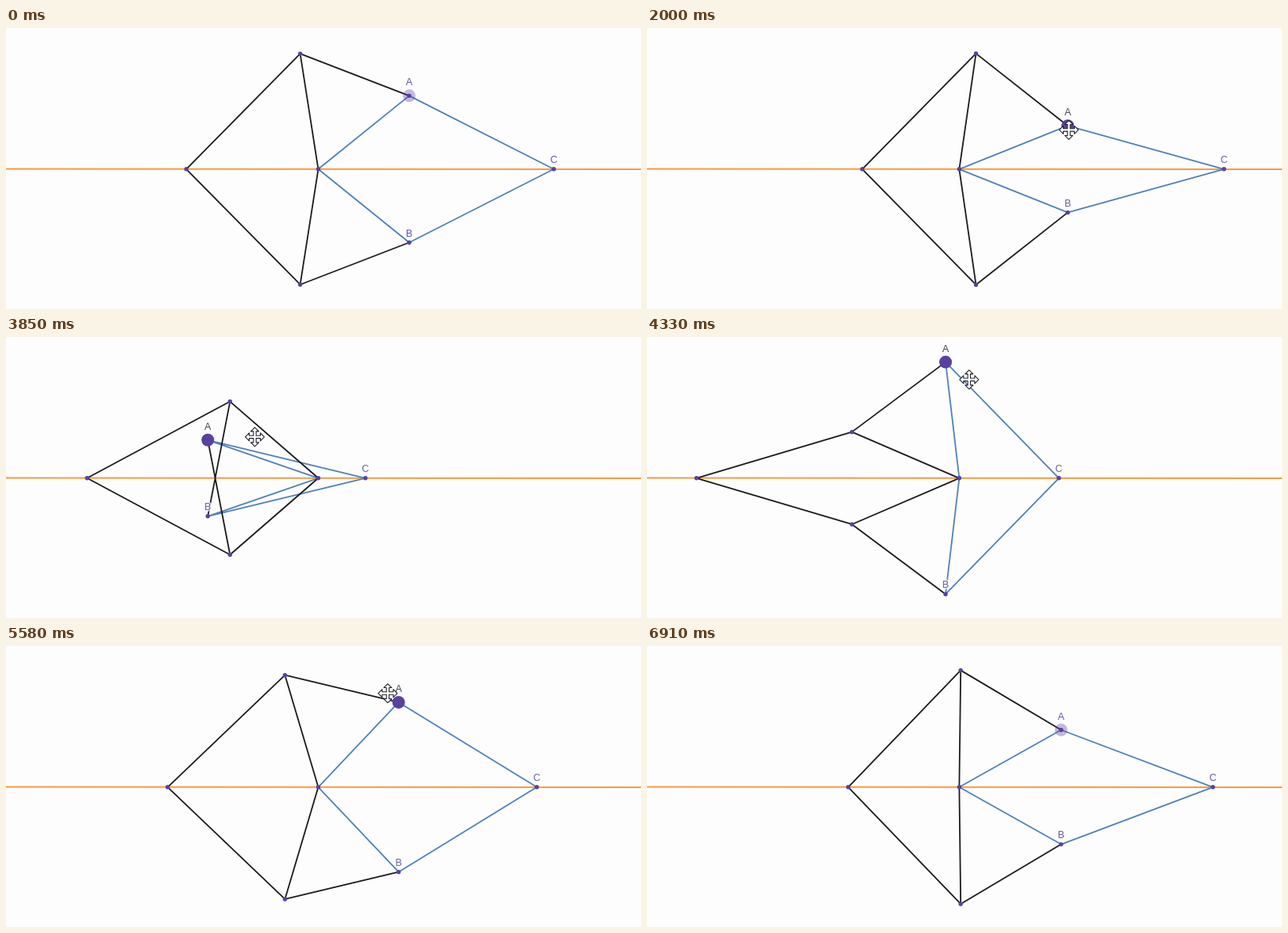
Animation of 800 by 354 pixels, one loop 7420 ms. Source, as an HTML page with a canvas:

```html
<!DOCTYPE html>
<html lang="en">
<head>
<meta charset="utf-8">
<title>Linkage</title>
<style>
html, body { margin: 0; width: 100%; height: 100%; overflow: hidden; background: #fefdfe; }
canvas { display: block; }
</style>
</head>
<body>
<canvas id="stage" width="800" height="354"></canvas>
<script>
const ctx = document.getElementById('stage').getContext('2d');
const LOOP = 7420, LEAD = 100;
const STALL = { from: 2940, to: 3090 };
const PIVOT = { x: 393.4, y: 177.8 }, SHORT = 147.2, LONG = 204.3;
const PURPLE = '#5a41a0', BLACK = '#1b1b1e', BLUE = '#4f82b8', ORANGE = '#f89b42';

// time and angle of A at the main turns of the drag
const TURNS = [
  [850, 38.9], [2000, 21.8], [2330, 8.2], [3090, -75.7], [3850, -198.9],
  [4850, -323.7], [5200, -342], [5580, -313.5], [6100, -286], [6880, -330.7]
];
const DRAG_START = TURNS[0][0], DRAG_END = TURNS.at(-1)[0];
const clamp = t => Math.min(Math.max(t, DRAG_START), DRAG_END);

function slope(i) {
  const a = TURNS[i - 1], b = TURNS[i + 1];
  return a && b ? (b[1] - a[1]) / (b[0] - a[0]) : 0;
}

// cubic Hermite curve through the turns
function angleAt(time) {
  const t = clamp(time);
  let i = 0;
  while (i < TURNS.length - 2 && t >= TURNS[i + 1][0]) i++;
  const [t0, a0] = TURNS[i], [t1, a1] = TURNS[i + 1], span = t1 - t0;
  const u = (t - t0) / span, v = 1 - u;
  return v * v * (1 + 2 * u) * a0 + u * u * (3 - 2 * u) * a1
    + span * u * v * (v * slope(i) - u * slope(i + 1));
}

function polar(deg, r) {
  const a = deg * Math.PI / 180;
  return { x: PIVOT.x + r * Math.cos(a), y: PIVOT.y - r * Math.sin(a) };
}

// the pointer runs ahead of A and cuts inside on the fast left turn
function pointerAt(t) {
  const cut = 58 * Math.exp(-(((t - 3600) / 750) ** 2));
  return polar(angleAt(t + LEAD), SHORT - cut);
}

const mirror = p => ({ x: p.x, y: 2 * PIVOT.y - p.y });
const onAxis = (p, side) => ({
  x: p.x + side * Math.sqrt(LONG ** 2 - (p.y - PIVOT.y) ** 2),
  y: PIVOT.y
});

function path(color, width, ...points) {
  ctx.beginPath();
  points.forEach(p => ctx.lineTo(p.x, p.y));
  ctx.strokeStyle = color;
  ctx.lineWidth = width;
  ctx.stroke();
}

function dot(p, r, color) {
  ctx.beginPath();
  ctx.arc(p.x, p.y, r, 0, 2 * Math.PI);
  ctx.fillStyle = color;
  ctx.fill();
}

function label(text, p, rise, color) {
  ctx.lineWidth = 3;
  ctx.strokeStyle = 'rgba(254,253,254,.8)';
  ctx.strokeText(text, p.x, p.y - rise);
  ctx.fillStyle = color;
  ctx.fillText(text, p.x, p.y - rise);
}

function moveCursor(p) {
  ctx.save();
  ctx.translate(p.x, p.y);
  ctx.beginPath();
  for (let arm = 0; arm < 4; arm++) {
    ctx.lineTo(-1.7, -1.7);
    ctx.lineTo(-1.7, -7);
    ctx.lineTo(-5, -7);
    ctx.lineTo(0, -12);
    ctx.lineTo(5, -7);
    ctx.lineTo(1.7, -7);
    ctx.rotate(Math.PI / 2);
  }
  ctx.closePath();
  ctx.fillStyle = '#fff';
  ctx.fill();
  ctx.strokeStyle = '#22222c';
  ctx.lineWidth = 1.1;
  ctx.stroke();
  ctx.restore();
}

function draw(time) {
  const dragging = time >= DRAG_START && time < DRAG_END;
  const t = time > STALL.from && time < STALL.to ? STALL.from : time;
  const angle = angleAt(t);
  const A = polar(angle, SHORT), B = mirror(A), C = onAxis(A, 1);
  const D = polar(angle + 60, SHORT), F = mirror(D), E = onAxis(D, -1);

  ctx.fillStyle = '#fefdfe';
  ctx.fillRect(0, 0, 800, 354);
  path(ORANGE, 2, { x: 0, y: 177.4 }, { x: 800, y: 178.1 });
  path(BLUE, 1.8, PIVOT, A, C, B, PIVOT);
  path(BLACK, 1.8, A, D, E, F, B);
  path(BLACK, 1.8, D, PIVOT, F);

  [PIVOT, A, B, C, D, E, F].forEach(p => dot(p, 2.7, PURPLE));
  dot(A, 8, dragging ? PURPLE : 'rgba(90,65,160,.36)');

  const ink = dragging ? '#6a64a4' : '#6656aa';
  label('A', A, 13, dragging ? '#48484e' : ink);
  label('B', B, 7.5, ink);
  label('C', C, 7.5, ink);
  if (dragging) moveCursor(pointerAt(t));
}

ctx.font = '12.5px "Liberation Sans", Arial, sans-serif';
ctx.textAlign = 'center';
ctx.lineJoin = 'round';
const start = performance.now();
function tick() {
  draw((performance.now() - start) % LOOP);
  requestAnimationFrame(tick);
}
tick();
</script>
</body>
</html>
```
